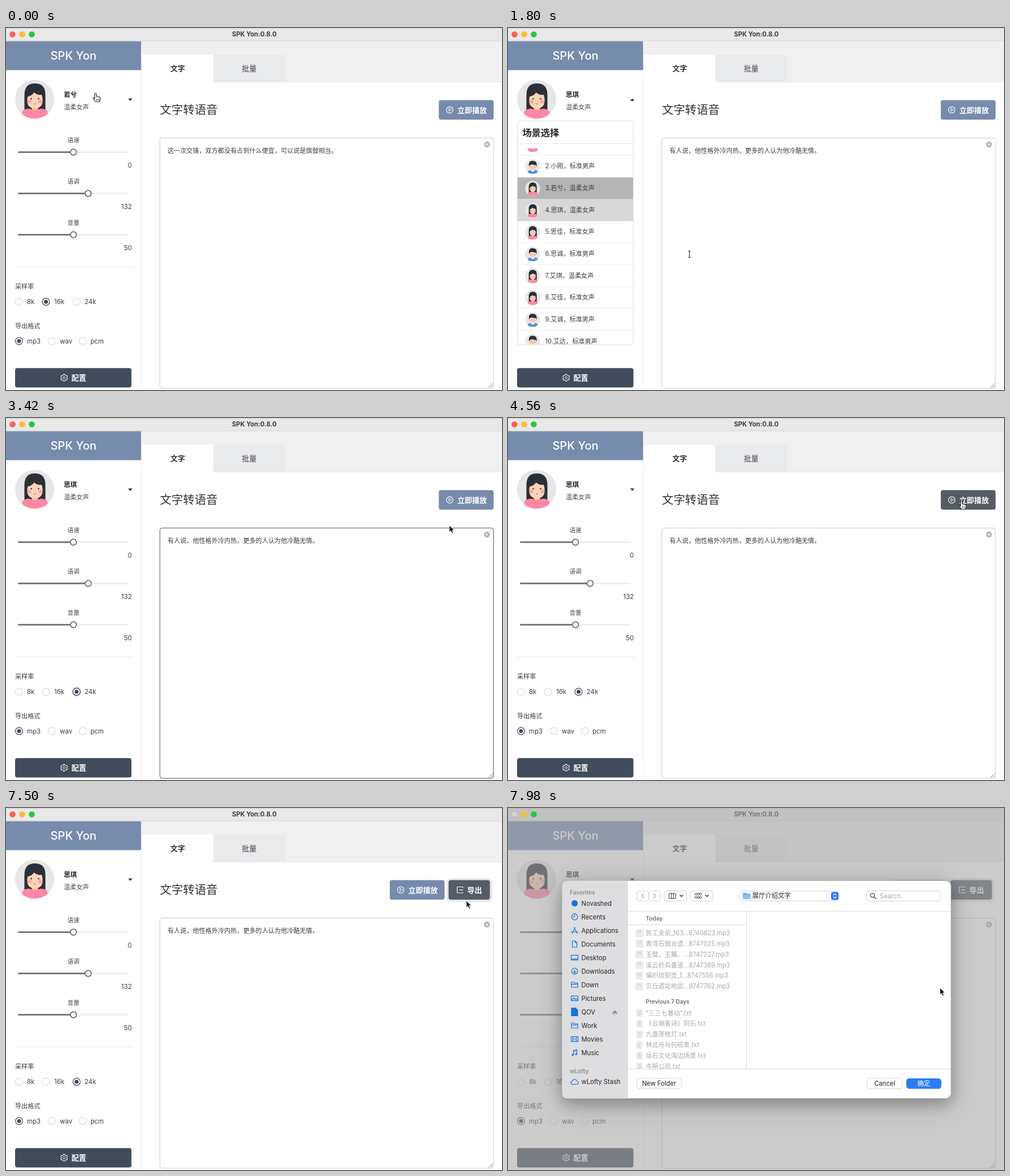
Recreate the animation shown at these times as an HTML page. Size 875 px wide and 640 px high, loop 8 s.

```html
<!DOCTYPE html>
<html lang="zh-CN">
<head>
<meta charset="utf-8">
<style>
html,body{margin:0;width:100%;height:100%;overflow:hidden;background:#fff}
svg{display:block;width:875px;height:640px;font-family:Inter,"Noto Sans CJK SC","Noto Sans CJK",sans-serif}
.dim{animation:dim 8s linear infinite}
.sheet{animation:sheet 8s ease-out infinite;transform-origin:438px 320px}
.pulse{animation:pulse 8s ease-out infinite}
.cursor{animation:cursor 8s ease-in-out infinite}
.tip{filter:drop-shadow(0 4px 6px #0002) drop-shadow(0 8px 16px #00000012)}
.lift{filter:drop-shadow(0 10px 14px #0004) drop-shadow(0 8px 26px #0002)}
@keyframes dim{0%,94.4%{opacity:0}97%,100%{opacity:1}}
@keyframes sheet{0%,94.4%{opacity:0;transform:scale(.86)}97.6%,100%{opacity:1;transform:scale(1)}}
@keyframes pulse{0%,46.4%{opacity:0}46.6%{opacity:1}52.5%{opacity:1}54%,100%{opacity:0}}
</style>
</head>
<body>
<script>
const LOOP = 8000, BLUE = '#778bad', SLATE = '#414c5b', FOCUS = '#565c66', ACCENT = '#1473e6';

// Times in ms between which each state is on screen.
const windows = {
  voiceA: [0, 1140], voiceB: [1140, LOOP],
  closedA: [0, 420], menu: [420, 1860], closedB: [1860, LOOP],
  rowHover: [840, 1860], tipShown: [900, 1500],
  typing: [1860, 3540], glow: [1860, 2640],
  rateA: [0, 2640], rateB: [2640, LOOP], radioRing: [2640, 3720],
  playIdle: [0, 3720], playBusy: [3720, 4680], playDone: [4680, 7260], playRest: [7260, LOOP],
  exportIdle: [4680, 7260], exportFocus: [7260, LOOP],
  inactive: [7560, LOOP],
  handA: [0, 1380], beamA: [1560, 2020], arrowA: [2020, 2520], handB: [2520, 2820],
  beamB: [2960, 3390], arrowB: [3390, 3510], handC: [3510, 7420], arrowC: [7420, LOOP],
  arrowD: [1380, 1560], arrowE: [2820, 2960]
};

// Pointer tip: time, x, y.
const path = [
  [0, 158, 116], [360, 158, 116], [900, 96, 323], [1260, 96, 323], [1740, 320, 400],
  [1920, 320, 400], [2280, 173, 447], [2580, 125, 481], [2760, 125, 481], [3420, 782, 190],
  [3660, 800, 147], [4800, 800, 147], [5400, 807, 150], [7260, 807, 150], [7500, 812, 164],
  [7900, 762, 318], [LOOP, 762, 318]
];

const pct = ms => ms / LOOP * 100 + '%';
let css = '@keyframes cursor{' +
  path.map(([t, x, y]) => `${pct(t)}{transform:translate(${x}px,${y}px)}`).join('') + '}';
for (const [name, [from, to]] of Object.entries(windows)) {
  const end = to < LOOP ? `${pct(to)}{opacity:0}` : '';
  css += `@keyframes ${name}{0%{opacity:0}${pct(from)}{opacity:1}${end || '100%{opacity:1}'}}` +
    `.${name}{animation:${name} 8s step-end infinite}`;
}
document.head.appendChild(document.createElement('style')).textContent = css;

const g = (cls, ...kids) => `<g class="${cls}">${kids.join('')}</g>`;
const at = (x, y, body, s = 1) => `<g transform="translate(${x} ${y}) scale(${s})">${body}</g>`;
const text = (x, y, s, size, fill = '#3c3d42', weight = 400, anchor = 'start') =>
  `<text x="${x}" y="${y}" font-size="${size}" fill="${fill}" font-weight="${weight}" text-anchor="${anchor}">${s}</text>`;
const rect = (x, y, w, h, fill, r = 0, stroke = 'none', sw = 1) =>
  `<rect x="${x}" y="${y}" width="${w}" height="${h}" rx="${r}" fill="${fill}" stroke="${stroke}" stroke-width="${sw}"/>`;
const circle = (x, y, r, fill, stroke = 'none', sw = 1) =>
  `<circle cx="${x}" cy="${y}" r="${r}" fill="${fill}" stroke="${stroke}" stroke-width="${sw}"/>`;
const shape = (d, fill = 'none', stroke = 'none', sw = 1) =>
  `<path d="${d}" fill="${fill}" stroke="${stroke}" stroke-width="${sw}" stroke-linejoin="round" stroke-linecap="round"/>`;

const HAIR = '#2b2f37', SKIN = '#fdd3b8';
const face = rect(-5, 8, 11, 14, '#f5bd9c', 4) + rect(-13, -14, 27, 30, SKIN, 12) +
  circle(-9, 4, 3.4, '#f9a9a6') + circle(10, 4, 3.4, '#f9a9a6') +
  circle(-6, -1, 1.3, '#333') + circle(7, -1, 1.3, '#333') + shape('M-1.5 8Q.5 9.5 2.5 8', 'none', '#d6605f');
const shirt = 'M-22 34V23Q-21 17-9 16.5Q.5 22 10 16.5Q22 17 23 23V34Z';
const portrait = body => circle(0, 0, 34.5, '#e6e6e8') + `<g clip-path="url(#disc)">${body}</g>`;
const woman = portrait(
  shape('M-18 20V-8Q-18-28 .5-28Q19-28 19-8V20Z', HAIR) + face +
  shape('M-15 0V-16Q0-26 16-16V0Q13-3 12.5-8Q4-7-1-12Q-5-6-12-5Q-12-2-15 0Z', HAIR) + shape(shirt, '#ff87a3'));
const man = portrait(
  circle(-14, 1, 4, SKIN) + circle(15, 1, 4, SKIN) + face +
  shape('M-17 0Q-21-26-3-27Q23-28 18 0L14-7Q4-8-4-10Q-10-7-13-7Z', HAIR) +
  shape(shirt, '#4a90e2') + shape('M-9 16L-3 25L.5 20L4 25L10 16Z', '#fff'));

const slider = (y, label, knob, value) => text(119, y - 18, label, 10.5, '#44454a', 400, 'middle') +
  rect(21, y - 1.5, 196, 3, '#eeeeef', 1.5) + rect(21, y - 1.5, knob - 21, 3, '#7b7980', 1.5) +
  circle(knob, y, 5.3, '#fff', '#6f6e76', 1.8) + text(222, y + 27, value, 11.5, '#3c3d42', 400, 'end');
const ringOff = (x, y) => circle(x, y, 6.4, '#fff', '#d0d0d4');
const ringOn = (x, y) => circle(x, y, 6.4, '#fff', SLATE, 1.2) + circle(x, y, 3.6, SLATE);

const playButton = (x, fill) => rect(x, 127.6, 96.7, 34.4, fill, 4) +
  circle(x + 19.3, 144.8, 5.7, 'none', '#fff', 1.2) + shape(`M${x + 18} 142.3v5l4-2.5z`, 'none', '#fff') +
  text(x + 32.7, 149.5, '立即播放', 13, '#fff', 600);
const exportButton = fill => rect(780.7, 127.6, 73, 34.4, fill, 4) +
  shape('M805 139.5H796V150H805M800 144.8H806M806 139.5v1M806 149v1', 'none', '#fff', 1.2) +
  text(813.7, 149.5, '导出', 13, '#fff', 600);

const windowBase = () => {
  let hex = '';
  for (let i = 0; i < 12; i++) {
    const r = i % 2 ? 5 : 6.4, a = i * Math.PI / 6;
    hex += `${i ? 'L' : 'M'}${(r * Math.sin(a)).toFixed(2)} ${(-r * Math.cos(a)).toFixed(2)}`;
  }
  return rect(0, 0, 875, 640, '#fff') +
    rect(0, 0, 875, 23.5, '#e9e8e9') + rect(0, 0, 875, 1, '#cfcfcf') + rect(0, 22.5, 875, 1, '#d3d2d3') +
    text(438, 14.7, 'SPK Yon:0.8.0', 11.2, '#3d3d3d', 700, 'middle') +
    circle(11.5, 11.3, 5.3, '#fe5f57') +
    rect(0, 23.5, 238.5, 51, BLUE) + text(119, 56.3, 'SPK Yon', 20, '#fff', 500, 'middle') +
    rect(238.5, 23.5, 1, 617, '#ececee') +
    rect(239.5, 23.5, 636, 72, '#f0f0f1') + rect(366, 47.5, 126.5, 47.5, '#e9eaec', 3) +
    rect(366, 94.7, 509, 1, '#e4e5e7') + shape('M240 96V50Q240 47 243 47H363Q366 47 366 50V96Z', '#fff') +
    text(303, 76.2, '文字', 13, '#2f3035', 600, 'middle') + text(429, 76.2, '批量', 13, '#444549', 400, 'middle') +
    text(271.5, 152, '文字转语音', 20.4, '#303136') +
    at(50.5, 126, woman) + text(102, 144, '温柔女声', 11.1, '#4a4b50') +
    g('voiceA', text(102, 122, '若兮', 11.5, '#222', 600)) + g('voiceB', text(102, 122, '思琪', 11.5, '#222', 600)) +
    rect(16, 422, 207, 1, '#ececee') + slider(219.5, '语速', 119, '0') +
    slider(292.5, '语调', 145, '132') + slider(365.5, '音量', 119, '50') +
    text(16, 461, '采样率', 11.1) + text(37, 488, '8k', 11.4) + text(85, 488, '16k', 11.4) + text(138.5, 488, '24k', 11.4) +
    [23, 70.5, 124.5].map(x => ringOff(x, 484)).join('') +
    g('rateA', ringOn(70.5, 484)) + g('radioRing', circle(124.5, 484, 8, 'none', '#dcdee2', 2)) + g('rateB', ringOn(124.5, 484)) +
    text(16, 531, '导出格式', 11.1) + text(37, 557.5, 'mp3', 11.4) + text(95, 557.5, 'wav', 11.4) + text(149, 557.5, 'pcm', 11.4) +
    ringOn(23, 553.5) + ringOff(80.5, 553.5) + ringOff(135.5, 553.5) +
    rect(16, 601.2, 205.3, 34.4, SLATE, 4) + at(102.5, 618.3, shape(hex + 'Z', 'none', '#fff', 1.1) + circle(0, 0, 2, 'none', '#fff')) +
    text(115.5, 623.3, '配置', 13, '#fff', 600);
};

const editor = () =>
  g('glow', rect(270.5, 193.5, 590, 444.5, 'none', 5, '#c9cbd0', 3)) +
  rect(271.5, 194.5, 588.5, 442.5, '#fff', 4, '#cbcbcd') +
  g('typing', rect(271.5, 194.5, 588.5, 442.5, 'none', 4, '#5c6068')) +
  g('voiceA', text(285, 221.3, '这一次交锋，双方都没有占到什么便宜，可以说是旗鼓相当。', 11.1)) +
  g('voiceB', text(285, 221.3, '有人说，他性格外冷内热，更多的人认为他冷酷无情。', 11.1)) +
  g('glow', rect(552.5, 210.5, 1, 13, '#222')) +
  circle(848.5, 206, 5.2, '#b4b4b6') + shape('M846.8 204.3l3.4 3.4m0-3.4l-3.4 3.4', 'none', '#fff', 1.1) +
  shape('M851.5 635.5l7-7M855.5 635.5l3-3', 'none', '#777', .9);

const buttons = () =>
  g('pulse', rect(761.5, 126, 101, 38, 'none', 6, '#e2e5ea', 4)) +
  g('playIdle', playButton(763.5, BLUE)) + g('playBusy', playButton(763.5, FOCUS)) +
  g('playDone', playButton(677, FOCUS)) + g('playRest', playButton(677, BLUE)) +
  g('exportIdle', exportButton(SLATE)) +
  g('exportFocus', rect(779, 126, 77, 38, 'none', 6, '#e6e8eb', 4), exportButton(FOCUS));

const menu = () => {
  const voices = ['小云，标准女声', '小刚，标准男声', '若兮，温柔女声', '思琪，温柔女声', '思佳，标准女声',
    '思诚，标准男声', '艾琪，温柔女声', '艾佳，标准女声', '艾诚，标准男声', '艾达，标准男声'];
  const rows = voices.map((v, i) => {
    const y = 187 + i * 38.65, fill = i === 2 ? '#b5b5b5' : '#fff';
    return rect(17, y, 204, 38.65, fill) + (i === 3 ? g('rowHover', rect(17, y, 204, 38.65, '#d8d8d8')) : '') +
      rect(17, y + 38, 204, 1, '#e3e3e5') + at(43.5, y + 19.3, v.endsWith('男声') ? man : woman, .38) +
      text(65.5, y + 22.7, `${i + 1}.${v}`, 11.1);
  }).join('');
  return g('menu', rect(16, 164, 208, 397, '#fff'), rect(16.5, 164.5, 204.5, 395.5, '#fff', 3),
    `<g clip-path="url(#list)">${rows}</g>`, rect(17, 204, 204, 1, '#e3e3e5'),
    rect(16.5, 164.5, 204.5, 395.5, 'none', 3, '#dfdfe1'), text(25.5, 190.5, '场景选择', 16.2, '#222', 600)) +
    g('tipShown', g('tip', shape('M165 317l-4 4l4 4z', '#faad14') + rect(164.3, 298.7, 207, 44.3, '#faad14', 3)),
      text(170.5, 317, '通用场景|中文及中英文混合场景|品质:', 11.1, '#fff', 600), text(170.5, 333.7, '标准版', 11.1, '#fff', 600));
};

const chevrons = () => [['closedA', 0], ['menu', 1], ['closedB', 0]].map(([c, up]) =>
  g(c, shape(up ? 'M215.5 129h7.5l-3.75-4.5z' : 'M215.5 124.5h7.5l-3.75 4.5z', '#333'))).join('');

const dialog = () => {
  const folder = 'M-5.5 4.5V-4.5H-1.5L0-3H5.5V4.5ZM-5.5-.8H5.5', doc = 'M-4-5.5H1L4-2.5V5.5H-4ZM1-5.5V-2.5H4';
  const cloud = 'M-4 4.5Q-7 4-6.5 1Q-6-1-4-1Q-3-5 1-4Q3.5-3.5 4-1Q7-.5 6.5 2.5Q6 4.5 4 4.5Z';
  const dial = 'M5.3 0A5.3 5.3 0 1 1-5.3 0A5.3 5.3 0 1 1 5.3 0';
  const screen = 'M-6-4.2H6V4.2H-6Z';
  const places = [['Novashed', '', 0], ['Recents', dial + 'M0-3.5V0H-3'], ['Applications', 'M-4.5 5L1-5M-1-5L4.5 5M-6 2.5H6'],
    ['Documents', doc], ['Desktop', screen + 'M-6 2.4H6'], ['Downloads', dial + 'M0-3V3M-2 1L0 3L2 1'], ['Down', folder],
    ['Pictures', screen + 'M-5 3L-1.5-1L1 2L3 0L5 3'], ['QOV', 'M-5.5-7H1.5L5.5-3V7H-5.5Z', 1], ['Work', folder],
    ['Movies', screen + 'M-3-4V4M3-4V4M-3 0H3'], ['Music', 'M-2 4V-4L4-5.5V2.5M-2-2L4-3.5']];
  const side = places.map(([name, d, solid], i) => {
    const y = 168.5 + i * 24;
    const icon = !d ? circle(0, 0, 5.5, ACCENT) : shape(d, solid ? ACCENT : 'none', ACCENT, 1.2) +
      (name === 'Music' ? circle(-3.3, 4, 1.8, ACCENT) + circle(2.7, 2.7, 1.8, ACCENT) : '');
    return at(117.5, y, icon) + text(129.5, y + 4, name, 11.2, '#242426');
  }).join('');
  const file = (name, y, audio) => rect(audio ? 225.5 : 227, y - 6.5, audio ? 12.5 : 9.5, 13, '#eeeeef', 1, '#e2e2e4', .8) +
    shape(audio ? `M229.5 ${y + 2}v-5l4-1v5` : `M229.5 ${y - 3}h5m-5 3h5m-5 3h5`, 'none', '#c6c6c9') + text(243, y + 4, name, 11.1, '#a9a9ab');
  const audio = ['民工支前_163...8746623.mp3', '青湾石鼓台遗...8747025.mp3', '玉璧、玉觿、...8747227.mp3',
    '溪云岭兵备道...8747389.mp3', '编织纹铜壶_1...8747556.mp3', '贝丘遗址地层...8747762.mp3'];
  const notes = ['“三三七暴动”.txt', '《云岫客诗》刻石.txt', '九盏莲枝灯.txt', '林远舟与何砚青.txt', '岳石文化海边场景.txt', '岑朔公司.txt'];
  const button = (x, y, w, h, fill = '#fff') => rect(x, y, w, h, fill, 4.5, fill === '#fff' ? '#d2d2d4' : fill);
  const down = (x, y = 154) => shape(`M${x - 2.5} ${y}l2.5 2.5l2.5-2.5`, 'none', '#333', 1.4);
  let grid = '';
  for (let i = 0; i < 6; i++) grid += rect(330 + i % 3 * 4.2, 150.5 + (i > 2) * 6, 3, 3.4, 'none', .5, '#444', .9);
  return g('lift', rect(95.5, 128.5, 686, 385, '#fff', 10, '#aaa', .8)) +
    shape('M210.5 128.5V513.5H105.5Q95.5 513.5 95.5 503.5V138.5Q95.5 128.5 105.5 128.5Z', '#dedddf') +
    rect(210, 129, 1, 384, '#d2d1d3') +
    text(109, 153, 'Favorites', 10, '#8d8c90', 600) + side + shape('M184.5 362l4-4l4 4zM184.5 364h8', '#8a8a8d', '#8a8a8d', .8) +
    text(109, 468.5, 'wLofty', 10, '#8d8c90', 600) + at(117.5, 484, shape(cloud, 'none', ACCENT, 1.2)) + text(129.5, 488, 'wLofty Stash', 11.2, '#242426') +
    button(227.5, 146.5, 20.5, 18) + button(249, 146.5, 20, 18) + shape('M239.5 151.5l-3.5 4l3.5 4M257 151.5l3.5 4l-3.5 4', 'none', '#aaa', 1.3) +
    button(275.5, 146.5, 40, 18) + rect(284, 151, 12, 9, 'none', 1, '#333') + shape('M288 151v9M292 151v9', 'none', '#333') + down(306) +
    button(321.5, 146.5, 39.5, 18) + grid + down(351) +
    button(407.5, 147, 177, 17) + shape('M414.5 161V150H419L420.5 151.5H427.5V161Z', '#55a9e8') + rect(414.5, 153.5, 13, 7.5, '#83c6f3', 1) +
    text(431, 159, '展厅介绍文字', 11.3, '#222') + rect(570, 148.5, 13, 14, '#2579f3', 3.5) +
    shape('M574 154l2.5-2.5l2.5 2.5M574 157l2.5 2.5l2.5-2.5', 'none', '#fff', 1.3) +
    button(632.5, 146.5, 131.5, 18) + circle(643, 154.5, 3.7, 'none', '#444', 1.3) + shape('M646 157.5l3 3', 'none', '#444', 1.4) +
    text(656, 159.5, 'Search', 11.2, '#aaaaac') +
    rect(211, 182, 570, 1, '#dcdcde') + rect(211, 206, 209, 1, '#dcdcde') + rect(420, 182, 1, 279, '#d6d6d8') +
    text(243, 198.5, 'Today', 10, '#707073', 600) + text(243, 346, 'Previous 7 Days', 10, '#707073', 600) +
    `<g clip-path="url(#files)">` + audio.map((n, i) => file(n, 221 + i * 18.85, 1)).join('') +
    notes.map((n, i) => file(n, 362.5 + i * 18.85, 0)).join('') + '</g>' + rect(211, 461, 570, 1, '#dcdcde') +
    button(227.5, 478, 78.5, 18.5) + text(266.5, 491, 'New Folder', 11.2, '#222', 400, 'middle') +
    button(633.5, 478, 62.5, 18.5) + text(664.5, 491, 'Cancel', 11.2, '#222', 400, 'middle') +
    button(703, 478.5, 61, 17.5, '#2c7df5') + text(733.5, 491, '确定', 11.3, '#fff', 400, 'middle');
};

const arrow = shape('M0 0V12.2L2.8 9.6L5 14.3L7.2 13.3L5 8.8H8.8Z', '#111', '#fff', .9);
const hand = shape('M-1.5 9V1Q-1.5-.5 0-.5Q1.5-.5 1.5 1V5Q3.4 4.2 4 5.7Q5.8 5 6.4 6.5Q8.3 6 8.3 8V10.5L7 14.5H.2Q-2.5 11-4.2 8.6Q-4.5 6.8-2.8 7.2Z', '#fff', '#222', 1.1) +
  shape('M1.5 9.5v3M3.8 9.5v3M6 9.5v3', 'none', '#222', .8);
const beam = shape('M-2-6Q0-6 0-4.5Q0-6 2-6M0-4.5V4.5M-2 6Q0 6 0 4.5Q0 6 2 6', 'none', '#222', 1.1);
const sprites = { arrow, hand, beam };
const pointer = g('cursor', ...Object.keys(windows)
  .filter(n => /^(arrow|hand|beam)[A-E]$/.test(n)).map(n => g(n, sprites[n.slice(0, -1)])));

document.body.innerHTML = `<svg viewBox="0 0 875 640">
<defs><clipPath id="disc"><circle r="34.5"/></clipPath>
<clipPath id="list"><rect x="17" y="213" width="204" height="346.5"/></clipPath>
<clipPath id="files"><rect x="211" y="207" width="209" height="254"/></clipPath></defs>` +
  windowBase() + editor() + buttons() + menu() + chevrons() +
  g('dim', rect(0, 0, 875, 640, 'rgba(164,164,164,.57)')) +
  g('inactive', circle(11.5, 11.3, 5.3, '#d2d2d2', '#b9b9b9', .7)) +
  circle(28.5, 11.3, 5.3, '#febc2e') + circle(45.5, 11.3, 5.3, '#28c840') +
  g('sheet', dialog()) + pointer + '</svg>';
</script>
</body>
</html>
```
